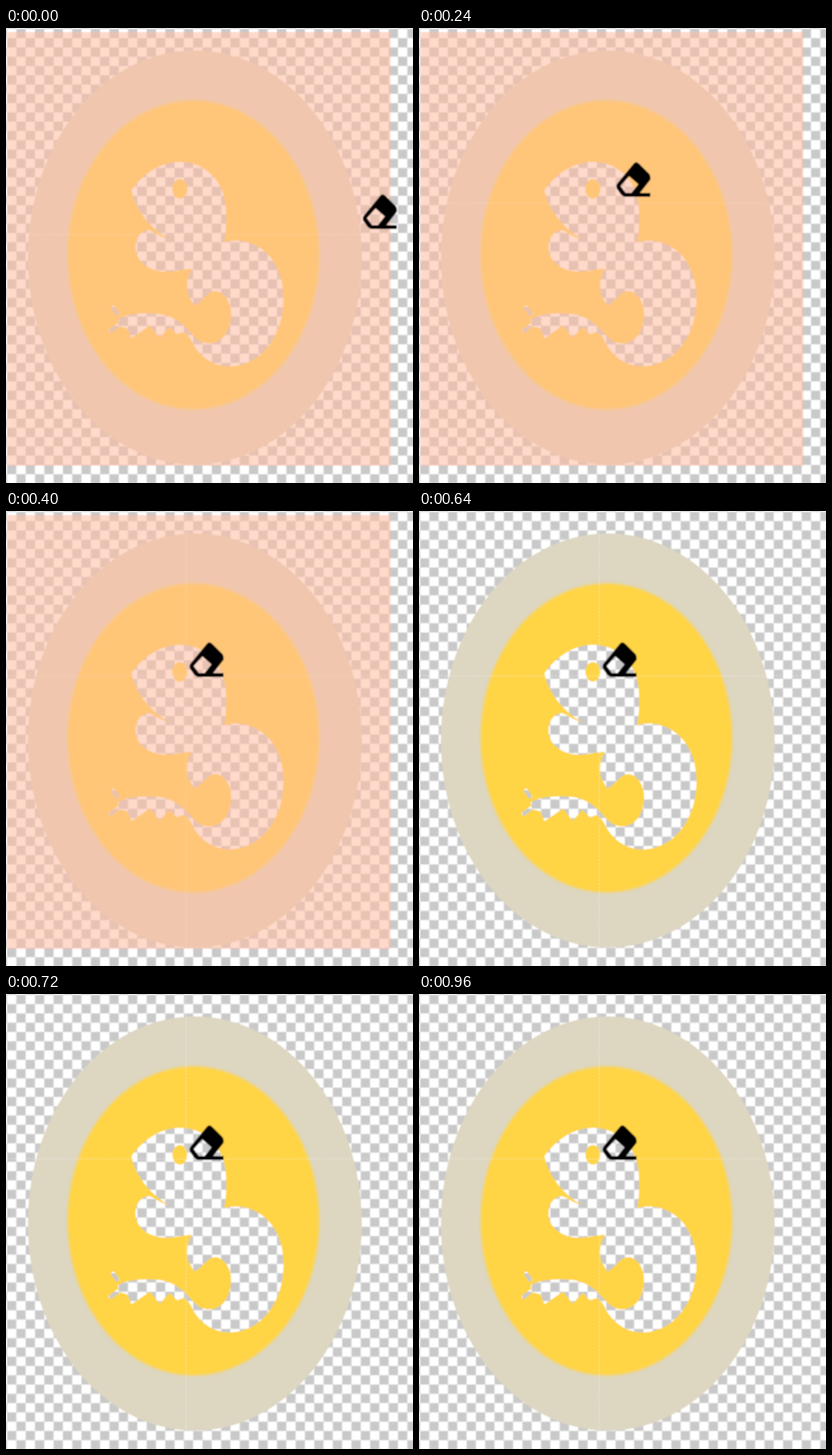
Write an HTML page that moves like this. It is 707 px wide and 792 px high and loops after 1040 ms.

```html
<!DOCTYPE html>
<html lang="en">
<head>
<meta charset="utf-8">
<title>Egg and eraser</title>
<style>
  html, body { margin: 0; width: 100%; height: 100%; overflow: hidden; background: #fff; }
  svg { display: block; width: 707px; height: 792px; }
</style>
</head>
<body>
<svg viewBox="0 0 707 792">
  <defs>
    <pattern id="checker" x="1.8" y="1.5" width="32.34" height="32.3" patternUnits="userSpaceOnUse">
      <rect width="33" height="33" fill="#fff"/>
      <path d="M16.17 0h16.17v16.15H0V32.3h16.17z" fill="#c9c9c9"/>
    </pattern>
    <filter id="soft"><feGaussianBlur stdDeviation="0.8"/></filter>
    <filter id="softer"><feGaussianBlur stdDeviation="2"/></filter>
  </defs>

  <g filter="url(#soft)">
    <rect x="-20" y="-20" width="747" height="832" fill="url(#checker)"/>
    <ellipse cx="328" cy="399.5" rx="290" ry="360.5" fill="#ddd6c1"/>
    <ellipse cx="325.5" cy="395" rx="218.5" ry="269" fill="#ffd444" filter="url(#softer)"/>

    <!-- embryo, seen as a hole down to the checkerboard -->
    <path fill="url(#checker)" d="M218 282 C232 262 262 233 302 233 C350 233 382 272 382 318
      C383 340 382 357 379 373 Q387 370 400 370 C438 370 482 402 482 470
      C482 540 440 589 388 589 C358 589 336 570 325 550 Q319 535 309 529
      L297 533 L284 520 L267 539 L250 518 L218 540 L211 523 L197 519 L194 507 L205 502
      Q222 496 254 497 C290 497 309 516 324 534 Q338 550 355 549
      C380 547 391 522 391 497 C391 475 377 458 363 458 C350 458 343 475 327 483
      L317 466 Q310 442 323 419 C305 420 292 425 272 424
      C243 421 225 403 225 382 C225 364 235 353 248 352 C257 353 264 363 283 367
      C242 344 222 306 218 282Z"/>
    <path fill="none" stroke="url(#checker)" stroke-width="7" stroke-linecap="round"
      d="M186 487l7 10M182 527l12 -9"/>
    <ellipse cx="302" cy="280" rx="13" ry="17" fill="#ffd444"/>

    <g stroke="#fff" stroke-width="1.5" stroke-dasharray="3 3" opacity=".5">
      <path id="guideX" d="M2 0H671"/>
      <path id="guideY" d="M313 0V792"/>
    </g>
    <rect id="wash" x="3" y="7" width="665" height="755" fill="#ffbca0" opacity=".57"/>

    <path id="eraser" fill-rule="evenodd" d="M31 3 Q35 -2 40 3 L58 21 Q61 25 60 31
      L42 54 H60 V61 H16 Q12 60 9 57 L2 47 Q-1 42 3 37Z
      M8 42 L23 25 L39 39 L27 54 H17Z"/>
  </g>
</svg>
<script>
  const LOOP = 1040;
  const poses = [
    { at: 0,   x: 619, y: 289, guide: 360 },
    { at: 160, x: 372, y: 240, guide: 328 },
    { at: 240, x: 342, y: 233, guide: 305 },
    { at: 320, x: 325, y: 230, guide: 292 },
    { at: 400, x: 318, y: 228, guide: 287 }
  ];
  const part = id => document.getElementById(id);
  const eraser = part('eraser'), guideX = part('guideX'), guideY = part('guideY'), wash = part('wash');
  const show = (el, on) => el.setAttribute('visibility', on ? 'visible' : 'hidden');

  function draw() {
    const time = performance.now() % LOOP;
    const pose = poses.findLast(p => p.at <= time);
    eraser.setAttribute('transform', `translate(${pose.x} ${pose.y})`);
    guideX.setAttribute('transform', `translate(0 ${pose.guide})`);
    show(guideY, time >= 400);
    show(wash, time < 640);
    requestAnimationFrame(draw);
  }
  draw();
</script>
</body>
</html>
```
